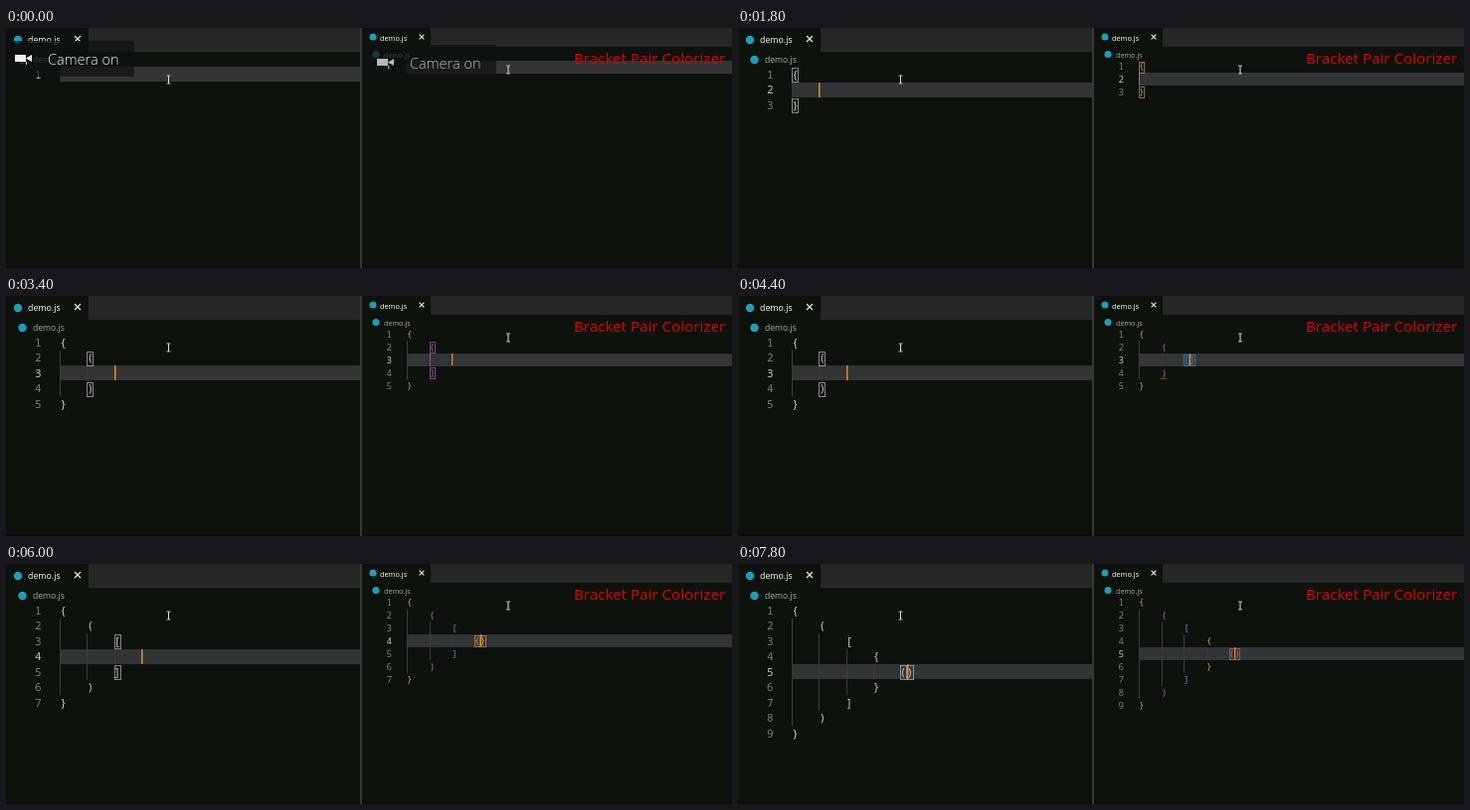
Write an HTML page with a canvas that moves like this. It is 730x242 px and loops after 8000 ms.

```html
<!DOCTYPE html>
<html lang="en">
<head>
<meta charset="utf-8">
<title>Bracket colouring comparison</title>
<style>
  html, body { margin: 0; width: 100%; height: 100%; overflow: hidden; background: #0d120d; }
  canvas { display: block; }
</style>
</head>
<body>
<canvas id="stage" width="730" height="242"></canvas>
<script>
const ctx = document.getElementById('stage').getContext('2d');
const LOOP = 8000, TICK = 200;
const UI = '"Open Sans", sans-serif';
const MONO = '"Noto Sans Mono", monospace';
const BG = '#0d120d';
const PAIRS = ['{}', '()', '[]', '{}', '()'];
const GOLD = '#d0a040', ORCHID = '#b864bc', BLUE = '#4590d4';

// typed: times a bracket pair appears; entered: times it is split over lines
const left = {
  x: 0, w: 356, barH: 24, tabW: 83, ui: 8.8,
  icon: [12, 12], name: [22, 15], close: [72, 11, 3],
  crumbIcon: [16.5, 32], crumb: [27, 35],
  codeX: 54.3, firstY: 47, pitch: 15.5, charW: 6.78, mono: 11, numX: 35.5,
  pointer: [163, 52],
  typed: [1600, 3000, 5600, 6800, 7600], entered: [1800, 3200, 5800, 7000],
  colors: ['#c8c8c8'], start: -500,
  toast: { box: [0, 13, 129, 36], icon: [9, 27], text: [42, 37], alpha: 1, fade: 600 }
};
const right = {
  x: 358, w: 372, barH: 19, tabW: 69, ui: 7.35,
  icon: [369, 9], name: [376, 12.5], close: [418, 9, 2.4],
  crumbIcon: [372, 26.5], crumb: [380, 29.5],
  codeX: 403, firstY: 39, pitch: 12.95, charW: 5.67, mono: 9.3, numX: 388,
  pointer: [504.5, 42],
  typed: [1000, 2800, 4400, 6000, 7400], entered: [1100, 3000, 4600, 6200],
  colors: [GOLD, ORCHID, BLUE, GOLD, ORCHID], start: -500, scopes: true,
  toast: { box: [358, 17, 135, 30], icon: [373, 31], text: [406, 40.5], alpha: 0.75, fade: 400 }
};

function rect(x, y, w, h, color) {
  ctx.fillStyle = color;
  ctx.fillRect(x, y, w, h);
}

function text(str, x, y, size, color, family = UI, weight = 400, align = 'left') {
  ctx.font = `${weight} ${size}px ${family}`;
  ctx.textAlign = align;
  ctx.fillStyle = color;
  ctx.fillText(str, x, y);
}

function line(points, color, width = 1) {
  ctx.strokeStyle = color;
  ctx.lineWidth = width;
  ctx.beginPath();
  points.forEach(([x, y]) => ctx.lineTo(x, y));
  ctx.stroke();
}

function dot([x, y], r, color) {
  ctx.fillStyle = color;
  ctx.beginPath();
  ctx.arc(x, y, r, 0, Math.PI * 2);
  ctx.fill();
}

function drawHeader(p) {
  const r = p.ui * 0.48;
  rect(p.x, 0, p.w, p.barH, '#252724');
  rect(p.x, 0, p.tabW, p.barH, BG);
  dot(p.icon, r, '#1d9fb8');
  text('demo.js', ...p.name, p.ui, '#ffffff');
  const [cx, cy, s] = p.close;
  line([[cx - s, cy - s], [cx + s, cy + s]], '#e4e4e4', 1.2);
  line([[cx + s, cy - s], [cx - s, cy + s]], '#e4e4e4', 1.2);
  dot(p.crumbIcon, r, '#1d9fb8');
  text('demo.js', ...p.crumb, p.ui * 0.98, '#a8aaa7');
}

function drawCode(p, t) {
  const passed = times => times.filter(at => at <= t);
  const depth = passed(p.entered).length;
  const typed = passed(p.typed).length;
  const inline = typed > depth;
  const age = t - Math.max(p.start, ...passed(p.typed), ...passed(p.entered));
  const settling = p.scopes && age <= 200;
  const total = depth * 2 + 1;
  const colX = level => p.codeX + level * 4 * p.charW;
  const rowY = row => p.firstY + row * p.pitch;
  const half = p.pitch / 2;
  const color = level => p.colors[level % p.colors.length];
  const glyph = (char, x, row, level) =>
    text(char, x, rowY(row) + p.mono * 0.33, p.mono, color(level), MONO);
  const matchBox = (x, row, level) => {
    ctx.globalAlpha = 0.65;
    ctx.strokeStyle = color(level);
    ctx.lineWidth = 1;
    ctx.strokeRect(Math.round(x) + 0.5, Math.round(rowY(row) - half) + 1.5,
      Math.round(p.charW) - 1, Math.round(p.pitch) - 2);
    ctx.globalAlpha = 1;
  };

  rect(p.codeX, Math.round(rowY(depth) - half), p.x + p.w - p.codeX,
    Math.floor(p.pitch + 0.1), '#333435');

  for (let row = 0; row < total; row++) {
    text(row + 1, p.numX, rowY(row) + p.mono * 0.33, p.mono,
      row === depth ? '#c4c6c2' : '#7b7e79', MONO, 400, 'right');
  }

  for (let level = 0; level < depth; level++) {
    const last = total - 1 - level, x = colX(level);
    const guideX = Math.round(x) + 0.5;
    const inner = p.scopes && level === depth - 1 && !inline;
    if (!(inner && settling)) {
      line([[guideX, rowY(level) + half], [guideX, rowY(last) - half]],
        inner ? color(level) : '#3b3e3a', inner ? 0.7 : 1);
    }
    glyph(PAIRS[level][0], x, level, level);
    glyph(PAIRS[level][1], x, last, level);
  }

  const cursorX = colX(depth) + (inline ? p.charW : 0);
  if (inline) {
    [0, 1].forEach(i => {
      const x = colX(depth) + i * p.charW;
      glyph(PAIRS[depth][i], x, depth, depth);
      matchBox(x, depth, depth);
    });
  } else if (depth) {
    const level = depth - 1;
    matchBox(colX(level), depth - 1, level);
    matchBox(colX(level), depth + 1, level);
    if (settling) {
      [[depth, cursorX], [depth + 1, colX(level)]].forEach(([row, end]) => {
        const y = Math.round(rowY(row) + half) - 0.5;
        line([[p.codeX, y], [end, y]], color(level), 0.6);
      });
    }
  }

  if (p.scopes && depth === 2 && t >= 3800) {
    const y = rowY(3) + half - 0.5, x = colX(1) - 1;
    line([0, 1, 2, 3, 4].map(i => [x + i * 1.6, y - i % 2]), '#d33a35');
  }

  if (Math.floor(age / 500) % 2 === 0) {
    rect(Math.round(cursorX), Math.round(rowY(depth) - half), p.charW * 0.22,
      Math.floor(p.pitch), '#e58a25');
  }
}

function drawPointer([x, y]) {
  line([[x + 0.5, y - 4], [x + 0.5, y + 4]], '#e6e6e6');
  [-4, 4].forEach(dy => line([[x - 1.5, y + dy], [x + 2.5, y + dy]], '#b8b8b8'));
}

function drawToast({ box, icon: [x, y], text: pos, alpha, fade }, t) {
  if (t >= fade) return;
  ctx.save();
  ctx.globalAlpha = 1 - t / fade;
  rect(...box, 'rgba(14, 18, 15, 0.72)');
  ctx.globalAlpha *= alpha;
  rect(x, y, 11, 7, '#f0f0f0');
  ctx.beginPath();
  [[11, 3.5], [17, 0], [17, 7]].forEach(([dx, dy]) => ctx.lineTo(x + dx, y + dy));
  ctx.fill();
  rect(x + 11, y + 7, 1, 3, '#d0d0d0');
  text('Camera on', ...pos, 14.55, '#f0f0f0', UI, 300);
  ctx.restore();
}

function draw(t) {
  rect(0, 0, 730, 242, BG);
  for (const pane of [left, right]) {
    drawHeader(pane);
    drawCode(pane, t);
    drawToast(pane.toast, t);
    drawPointer(pane.pointer);
  }
  rect(0, 240, 730, 2, '#0e0a0c');
  rect(356, 0, 2, 242, '#363836');
  text('Bracket Pair Colorizer', 571, 36, 15.2, '#e00000');
}

function frame(now) {
  draw(Math.floor((now % LOOP) / TICK) * TICK);
  requestAnimationFrame(frame);
}
requestAnimationFrame(frame);
</script>
</body>
</html>
```
